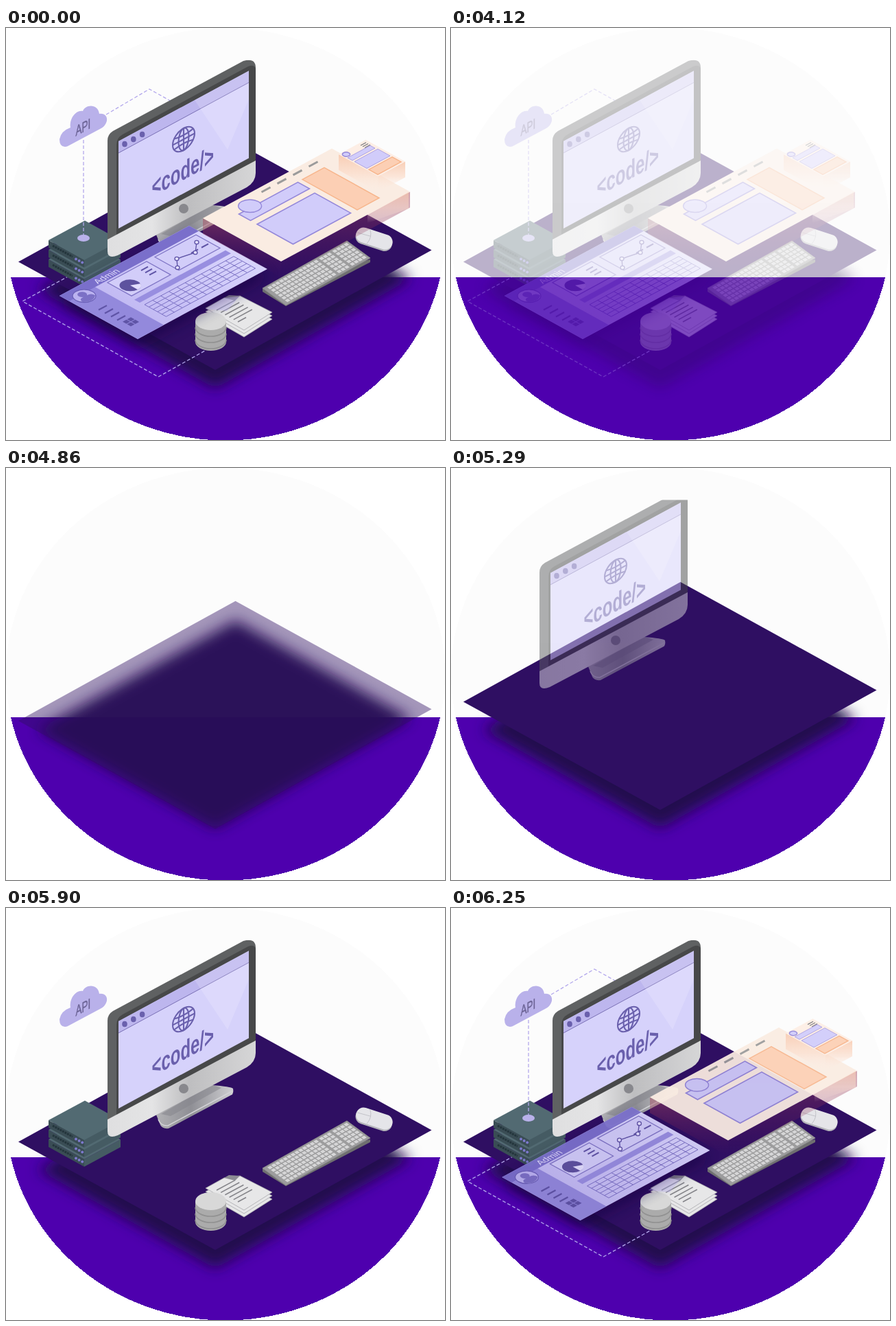
Write an HTML page that moves like this. It is 640x600 px and loops after 6.32 s.

```html
<!DOCTYPE html>
<html lang="en">
<head>
<meta charset="utf-8">
<title>Isometric workspace</title>
<style>
html, body { margin: 0; width: 100%; height: 100%; overflow: hidden; background: #fff; }
svg { display: block; width: 640px; height: 600px; }
svg * { vector-effect: non-scaling-stroke; }
text { font-family: "Liberation Sans", Arial, sans-serif; }
.dash { fill: none; stroke: #b3a8ec; stroke-width: 1.3; stroke-dasharray: 5 3; }
</style>
</head>
<body>
<svg id="stage" viewBox="0 0 640 600"></svg>
<script>
const poly = (pts, fill, more = '') => `<polygon points="${pts}" fill="${fill}" ${more}/>`;
const path = (d, fill, more = '') => `<path d="${d}" fill="${fill}" ${more}/>`;
const rect = (x, y, w, h, fill, more = '') =>
  `<rect x="${x}" y="${y}" width="${w}" height="${h}" fill="${fill}" ${more}/>`;
const oval = (x, y, rx, ry, fill, more = '') =>
  `<ellipse cx="${x}" cy="${y}" rx="${rx}" ry="${ry}" fill="${fill}" ${more}/>`;
const line = (d, color, w) => path(d, 'none', `stroke="${color}" stroke-width="${w}"`);
const edge = (color, w) => `stroke="${color}" stroke-width="${w}"`;
const range = (n, fn) => Array.from({ length: n }, (_, i) => fn(i)).join('');
const grad = (id, dir, ...stops) => `<linearGradient id="${id}" ${dir}>` +
  stops.map(([o, c, a = 1]) => `<stop offset="${o}" stop-color="${c}" stop-opacity="${a}"/>`).join('') +
  '</linearGradient>';
const part = (id, body) => `<g id="${id}">${body}</g>`;

// Floor plane: x runs up-right, y runs down-right
const UP = .54, FALL = .553;
const floor = (x, y, body) => `<g transform="matrix(1 ${-UP} 1 ${FALL} ${x} ${y})">${body}</g>`;
// Wall plane: x runs up-right, y runs straight down
const wall = (x, y, sx, body) => `<g transform="matrix(${sx} ${-UP * sx} 0 1 ${x} ${y})">${body}</g>`;

// Box with its left corner at x, y; the sides hang down by h
function slab(x, y, a, b, h, top, left, right) {
  const fx = x + b, fy = y + FALL * b, rx = fx + a, ry = fy - UP * a;
  return poly([x, y, fx, fy, fx, fy + h, x, y + h], left) +
    poly([fx, fy, rx, ry, rx, ry + h, fx, fy + h], right) +
    floor(x, y, rect(0, 0, a, b, top));
}

const DOWN = 'x1="0" y1="0" x2="0" y2="1"';
const INK = '#6a60ad', DEEP = '#5f54a6', LILAC = '#d6d2fb', RIM = '#9589da';

const defs = `<defs>
  <clipPath id="top"><rect y="46.5" width="640" height="554"/></clipPath>
  <clipPath id="disc"><ellipse cx="320" cy="300" rx="320" ry="300"/></clipPath>
  <filter id="soft" x="-20%" y="-20%" width="140%" height="140%"><feGaussianBlur stdDeviation="10"/></filter>
  ${grad('chinFill', '', [0, '#dfdfe0'], [.3, '#e4e4e5'], [.55, '#bebec0'], [1, '#d6d6d7'])}
  ${grad('baseFill', '', [0, '#b2b2b5'], [.45, '#8f8f95'], [1, '#cfcfd2'])}
  ${grad('boardFill', '', [0, '#bdb4f1'], [1, '#d8d4fc'])}
  ${grad('glow', DOWN, [0, '#a8485c', .5], [1, '#701850', 0])}
  ${grad('peach', DOWN, [0, '#f8c9ae', .9], [.5, '#fbdcca', .7], [1, '#fdeee4', 0])}
</defs>`;

const backdrop = `<g shape-rendering="crispEdges">
  ${oval(320, 300, 320, 300, '#fcfcfc')}
  ${path('M7 363A320 300 0 0 0 633 363Z', '#4e00ae')}</g>`;

const shadow = `<g clip-path="url(#disc)">
  ${poly('335,222 591,365 305,525 46,381', '#210b4e', 'filter="url(#soft)"')}</g>`;
const plane = poly('334.5,166 620.5,323.5 305,498 18,340.5', '#2f0f62');

const servers = range(3, i => {
  const dy = 28 - i * 14;
  return slab(62, 309 + dy, 53, 52, 11, '#526a72', '#3a4d55', '#455b63') +
    `<path d="M68 ${317 + dy}l29 16" stroke="#24353c" stroke-width="3" stroke-dasharray="3 1"/>` +
    range(3, k => oval(102 + k * 4.6, 336.5 + dy + k * 2.5, 2, 2, '#7d79cc'));
});

const cloud = path('M86 173Q78 173 78 162Q80 150 94 145C92 132 102 119 112 121C116 111 134 110 136 125' +
  'C144 124 148 129 147 135C146 140 142 145 137 147L92 171Q89 173 86 173Z', '#b9b1ea') +
  wall(101.5, 157.5, .64, `<text font-size="21" fill="#6d6597" ${edge('#6d6597', .5)}>API</text>`);

const globe = wall(259, 162, 1, `<g fill="none" ${edge(INK, 2.1)}>
  <circle r="16"/><ellipse rx="7.5" ry="16"/>
  <path d="M0-16V16M-16 0H16M-14-8Q0-4 14-8M-14 8Q0 4 14 8"/></g>`);

const monitor = `
  ${path('M219 301L225 316Q228 322 237 321L329 272Q332 270 331 263Q328 260 300 258Z', 'url(#baseFill)')}
  ${line('M222 308Q226 318 236 317L331 266', '#d3d3d6', 1.5)}
  ${poly('226,300 285,266 302,258 314,262 240,303', '#85858d', 'opacity=".55"')}
  ${path('M148 312V164Q148 155 156 150L346 48Q364 43 364 58V196Z', '#5f6162')}
  ${path('M161 306V170Q161 160 170 155L353 56Q364 52 364 62V196Z', '#474849')}
  ${path('M148 308L364 193V211Q364 224 351 232L163 331Q148 337 148 325Z', 'url(#chinFill)')}
  ${wall(164, 165, 1, rect(0, 0, 190, 127, LILAC) + rect(0, 0, 190, 17, '#bdb6ee') + line('M0 17H190', '#7a70b5', 1))}
  ${poly('275,105 354,62 354,104 323,177', '#fff', 'opacity=".16"')}
  ${range(3, i => oval(173 + i * 12.8, 169 - i * 7, 3.8, 4.3, INK))}
  ${globe}
  ${wall(212.5, 246, .63, `<text font-size="38" font-weight="700" fill="${INK}">&lt;code/&gt;</text>`)}
  ${oval(259, 263, 7, 7, '#88888d')}`;

const keys = range(6, r => range(20, c =>
  rect(4 + c * 4.55 + (c > 12) * 2 + (c > 15) * 2, 6 + r * 15, 3.6, 11, '#d6d6d7')));
const keyboard = poly('374,379 531,337 531,341 408,405 374,384', '#6f6f70') +
  `<g transform="matrix(1.23 -.69 .34 .25 374 379)">${rect(0, 0, 100, 100, '#9c9c9d', edge('#8a8a8b', 1))}${keys}</g>`;

const pill = (dy, fill) => rect(-27.5, dy - 11, 55, 22, fill, 'rx="11"');
const mouse = `<g transform="translate(536.5 308) rotate(18)">
  ${pill(1, '#b4b4ba')}${pill(-1.5, '#e5e5e9')}${line('M-10 -12Q-3 -3 -8 9M-27 -2L-6 -3', '#c3c3c9', 1)}</g>`;

const papers = range(3, i =>
  path(`M291 ${418 - i * 5}l27-15l23-3l47 24l-41 26Z`, '#e7e7e8', edge('#a9a9ad', .8))) +
  poly('318,393 325,389 341,390 334,397', '#8d8d94') +
  range(6, i => {
    const n = i < 5 ? 27 : 12;
    return line(`M${307 + i * 6.2} ${411 + i * 3.4}l${n} ${-n * UP}`, '#85858a', 1.6);
  });

const database = path('M276 428V457A22.5 13 0 0 0 321 457V428Z', '#ababab') +
  range(3, i => line(`M276 ${436 + i * 9}a22.5 13 0 0 0 45 0`, '#919191', 1.6)) +
  oval(298.5, 427, 22.5, 13, '#d8d8d8');

const wires = '<path class="dash" d="M146 126L209 89L245 109M92 361L24 398L222 508L290 470"/>';
const link = `<path class="dash" d="M113 163V304"/>${oval(113, 306, 9, 5, '#b9b1ea')}`;

function admin() {
  const box = (x, w) => rect(x, 17, w, 35, '#d2cdf9', edge('#8076c6', 1.3));
  const menu = range(4, i => line(`M10 ${47 + i * 9}h12`, DEEP, 2.2));
  const tiles = range(4, i => rect(12 + (i % 2) * 6.5, 80 + (i >> 1) * 6.5, 5.5, 5.5, DEEP));
  const grid = range(6, i => `M51 ${73 + i * 6.3}h130`) + range(12, i => `M${51 + i * 11.82} 73v31.5`);
  const legend = range(3, i => line(`M94 ${25 + i * 6}h10`, DEEP, 2));
  const nodes = [[250, 349], [249, 336], [276, 327], [278, 312]];
  const face = rect(0, 0, 189, 114, 'url(#boardFill)') + rect(0, 0, 38, 114, '#9389dc') +
    rect(0, 0, 189, 14, '#7a6fcb') +
    '<text x="44" y="12" font-size="11.8" fill="#e3dffd">Admin</text>' +
    `<circle cx="18" cy="18" r="12" fill="#bbb3f0" ${edge('#6c61b8', 1.3)}/>` +
    path('M9 25Q9 18 16 19A5 5 0 1 1 21 19Q27 19 27 25Q18 33 9 25Z', '#7c71c6') +
    menu + tiles + box(53, 57) + box(122, 60) + legend +
    '<circle cx="66" cy="37" r="11" fill="#5d529e"/>' + path('M66 37L76 42A11 11 0 0 1 66 48Z', '#e3dffd') +
    line('M169 38h10M154 38h10', DEEP, 2) +
    rect(50, 59, 133, 8, '#988ee0') + line(grid, '#7b71c4', 1);
  return `<g filter="url(#soft)" opacity=".6">${floor(78, 401, rect(0, 0, 189, 114, '#17063f'))}</g>` +
    floor(78, 390, face) + line('M' + nodes.join('L'), DEEP, 1.4) +
    nodes.map(p => oval(...p, 3, 2.7, '#e5e1ff', edge(DEEP, 1.3))).join('') +
    poly('291,409 318,393 340,391 322,412', '#b9aef0', 'opacity=".4"');
}

function page() {
  const panel = (x, y, w, h, w2 = 1.6) => rect(x, y, w, h, '#d1ccfa', edge(RIM, w2));
  const disc = (x, y, r) => oval(x, y, r, r, '#d1ccfa', edge(RIM, 1.5));
  const warm = (x, y, w, h) => rect(x, y, w, h, '#fccfb4', edge('#f7b68d', 1.5));
  const layout = range(4, i => line(`M${78 + i * 23} 7.5h13`, '#9b9b9b', 3)) +
    warm(125, 20, 32, 80) + panel(32, 20.5, 86, 17) + disc(51, 17.6, 12) + panel(32, 47, 84, 52.5);
  const card = disc(5.6, 5.4, 4) + range(3, i => line(`M28 ${4 + i * 3}h8`, '#77777b', 1.2)) +
    panel(2, 11, 33, 7, .7) + panel(2, 21, 34, 18, .7) + warm(2, 42, 34, 13);
  return slab(287, 277, 188, 114, 23, '#faece2', 'url(#glow)', 'url(#glow)') +
    poly('527,272 587,239 587,263 527,284', 'url(#peach)', 'opacity=".7"') +
    floor(287, 277, layout) +
    slab(485, 184, 39.5, 57.5, 23, '#fdeee5', 'url(#peach)', 'url(#peach)') +
    floor(485, 184, card);
}

const layers = { shadow, plane, wires, servers, link, cloud, monitor, keyboard, mouse, papers, database,
  admin: admin(), page: page() };
const stage = document.getElementById('stage');
stage.innerHTML = defs + backdrop + '<g id="scene" clip-path="url(#top)">' +
  Object.entries(layers).map(([id, body]) => part(id, body)).join('') + '</g>';

// Entrances: start and length of the fade, then the offset that eases out over `move`
const enter = (id, at, fade, dx = 0, dy = 0, move = fade) =>
  ({ el: document.getElementById(id), at, fade, dx, dy, move });
const entrances = [
  enter('shadow', 4620, 220),
  enter('plane', 4750, 190, 0, 28.5, 420),
  enter('monitor', 5160, 260, -38, -24),
  ...['servers', 'cloud', 'keyboard', 'mouse', 'papers', 'database']
    .map((id, i) => enter(id, 5380 + i * 55, 180, 0, 14)),
  enter('wires', 5910, 200),
  enter('link', 5910, 200),
  enter('admin', 5960, 310, -66, 36, 380),
  enter('page', 5960, 310, 56, -28, 380)
];

const LOOP = 6320, LEAVE = 3720, GONE = 4320;
const bursts = [[LEAVE, GONE, 16], [4660, 5290, 12], [5360, 5980, 10], [6040, 6250, 4]];
const unit = v => Math.min(1, Math.max(0, v));
const ease = p => p < .5 ? 4 * p ** 3 : 1 - 4 * (1 - p) ** 3;

// The picture holds still between evenly spaced steps
function hold(time) {
  const burst = bursts.filter(b => b[0] <= time).pop();
  if (!burst) return 0;
  const [from, to, steps] = burst, gap = (to - from) / (steps - 1);
  return from + gap * Math.min(steps - 1, Math.floor((time - from) / gap + 1e-6));
}

const scene = document.getElementById('scene');
const start = performance.now();

function draw(now) {
  const t = hold(Math.max(0, now - start) % LOOP);
  const leaving = t <= GONE;
  scene.style.opacity = leaving ? unit((GONE - t) / (GONE - LEAVE + 40)) : 1;
  for (const { el, at, fade, dx, dy, move } of entrances) {
    const rest = leaving ? 0 : 1 - ease(unit((t - at) / move));
    el.style.opacity = leaving ? 1 : unit((t - at) / fade);
    el.setAttribute('transform', `translate(${dx * rest} ${dy * rest})`);
  }
  requestAnimationFrame(draw);
}
draw(start);
</script>
</body>
</html>
```
